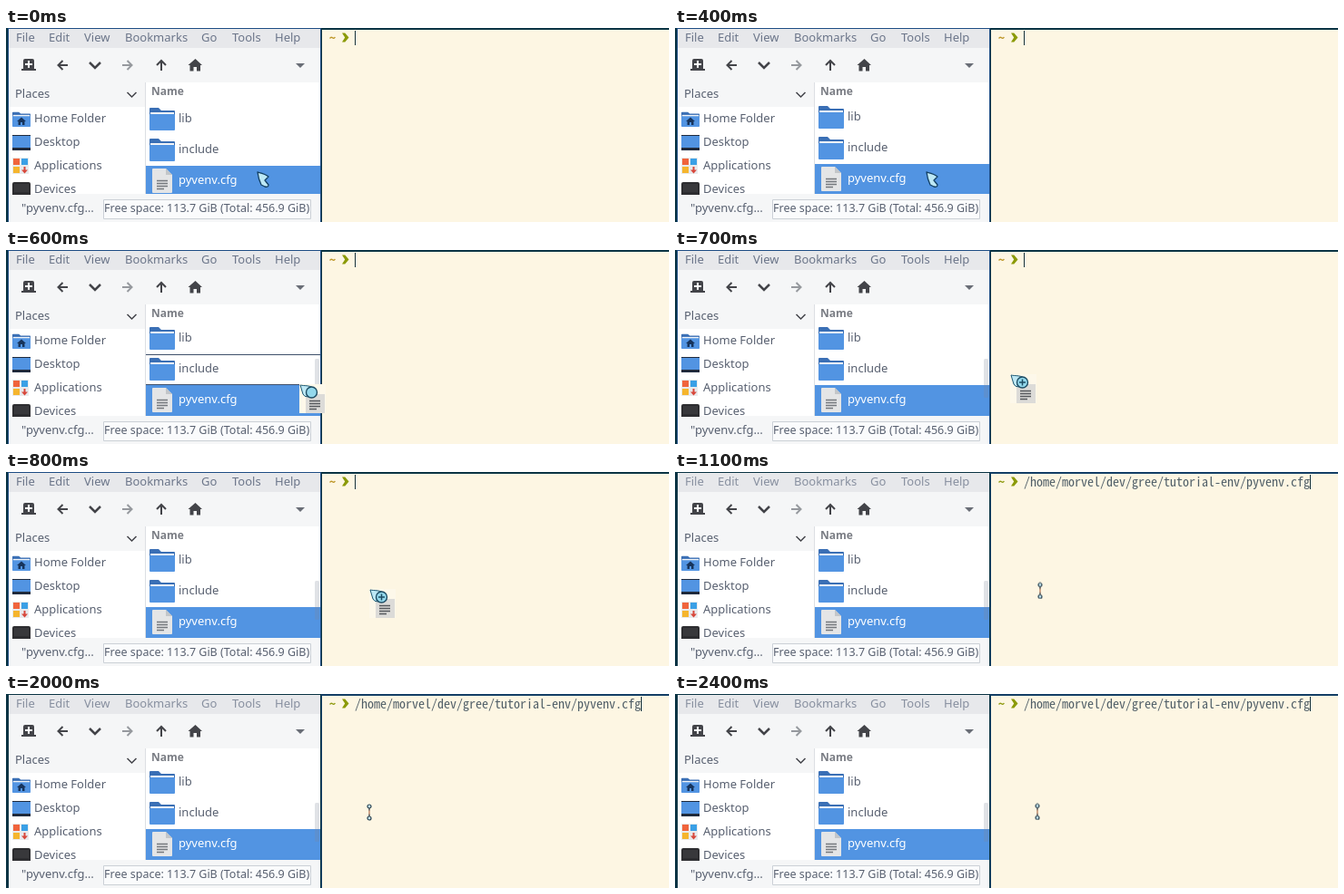
Write an HTML page that moves like this. It is 730x214 px and loops after 2.5 s.

```html
<!DOCTYPE html>
<html lang="en">
<head>
<meta charset="utf-8">
<title>Drag a file into the terminal</title>
<style>
html, body { margin: 0; width: 100%; height: 100%; overflow: hidden; background: #fdf6e3; }
svg { display: block; }
text { font: 13px "Noto Sans", "Open Sans", sans-serif; fill: #586070; white-space: pre; }
.bold { font-weight: 700; font-size: 12px; fill: #7a7d84; }
.small { font-size: 12.5px; }
.term { font: 14px "Noto Sans Mono CJK JP", "Noto Sans Mono CJK SC", "Noto Sans Mono", monospace; fill: #505f68; }
.icon { fill: none; stroke: #434449; stroke-width: 2; }
.solid { fill: #434449; }

.menu, .files, .shell, .tilde, .rows, .target, .thumb, .arrow, .drag, .plus, .paste, .caret, .beam {
  animation: 2500ms step-end infinite;
}
.menu { animation-name: menu; }
.menu text { fill: inherit; }
.files { animation-name: files; }
.shell { animation-name: shell; }
.tilde { animation-name: tilde; font-weight: 700; }
.rows { animation-name: rows; }
.target { animation-name: target; }
.thumb { animation-name: thumb; }
.arrow { animation-name: arrow; }
.drag { animation-name: drag; }
.plus { animation-name: plus; }
.paste { animation-name: paste; }
.caret { animation-name: caret; }
.beam { animation-name: beam; }

@keyframes menu { 0% { fill: #6b7589; } 44%, 100% { fill: #878f9f; } }
@keyframes files { 0% { fill: #1f4e85; } 44%, 100% { fill: #0a3444; } }
@keyframes shell { 0% { fill: #0a3444; } 44%, 100% { fill: #143f66; } }
@keyframes tilde { 0% { fill: #bd9526; } 44%, 100% { fill: #8f9a10; } }
@keyframes rows {
  0% { transform: translateY(0); }
  16% { transform: translateY(-2px); }
  20%, 100% { transform: translateY(-3px); }
}
@keyframes target { 0% { visibility: hidden; } 24% { visibility: visible; } 28%, 100% { visibility: hidden; } }
@keyframes thumb { 0% { visibility: hidden; } 24%, 100% { visibility: visible; } }
@keyframes arrow {
  0% { transform: translate(277px, 159px); visibility: visible; }
  20% { transform: translate(295px, 156px); visibility: visible; }
  24%, 100% { visibility: hidden; }
}
@keyframes drag {
  0% { visibility: hidden; }
  24% { transform: translate(324px, 149px); visibility: visible; }
  28% { transform: translate(370px, 138px); visibility: visible; }
  32% { transform: translate(401px, 130px); visibility: visible; }
  44%, 100% { visibility: hidden; }
}
@keyframes plus { 0% { opacity: 0; } 28%, 100% { opacity: 1; } }
@keyframes paste { 0% { visibility: hidden; } 44%, 100% { visibility: visible; } }
@keyframes caret { 0% { transform: translateX(384px); } 44%, 100% { transform: translateX(699px); } }
@keyframes beam {
  0% { visibility: hidden; }
  44% { transform: translate(402px, 124.5px); visibility: visible; }
  80% { transform: translate(400px, 124px); visibility: visible; }
  96%, 100% { transform: translate(399px, 123.5px); visibility: visible; }
}
</style>
</head>
<body>
<svg width="730" height="214" viewBox="0 0 730 214">
  <defs>
    <clipPath id="list"><path d="M154 79h192v104H154z"/></clipPath>
    <clipPath id="side"><path d="M3 87h150v97H3z"/></clipPath>
    <g id="folder">
      <path fill="#3a6fb5" d="M0 2q0-1 1-1h9l3 3h14q1 0 1 1v6H0z"/>
      <path fill="#f2f4f7" d="M1 6h26v4H1z"/>
      <path fill="#5294e2" d="M0 9q0-1 1-1h26q1 0 1 1v16q0 1-1 1H1q-1 0-1-1z"/>
    </g>
    <g id="page">
      <path fill="#e4e5e6" d="M1 0h14l7 7v19q0 1-1 1H1q-1 0-1-1V1q0-1 1-1z"/>
      <path fill="#c3c6c9" d="M15 0l7 7h-7z"/>
      <path stroke="#74787d" stroke-width="1.4" d="M5 13.500h12M5 16.500h12M5 19.500h12M5 22.500h8"/>
    </g>
  </defs>

  <!-- File manager -->
  <path fill="#f5f6f7" d="M0 0h348v214H0z"/>
  <path fill="#e7e8eb" d="M3 1h343v21H3z"/>
  <g class="menu">
    <text x="11" y="15">File</text>
    <text x="47" y="15">Edit</text>
    <text x="86" y="15">View</text>
    <text x="131" y="15">Bookmarks</text>
    <text x="215" y="15">Go</text>
    <text x="249" y="15">Tools</text>
    <text x="296" y="15">Help</text>
  </g>

  <path class="solid" d="M19 36q0-2 2-2h8q2 0 2 2v9h2v2H17v-2h2z"/>
  <path stroke="#fff" stroke-width="2" d="M25 36v8M21 40h8"/>
  <path class="icon" d="M68 41H58M62.500 36l-5 5 5 5"/>
  <path class="icon" style="stroke-width:2.500" d="M92 38l6 6 6-6"/>
  <path class="icon" style="stroke:#96999e" d="M128 41h10M133.500 36l5 5-5 5"/>
  <path class="icon" d="M171 47V36M166 41l5-5 5 5"/>
  <path class="solid" d="M208.500 34l7.500 7h-2v6.500h-4V43h-3.500v4.500h-4V41h-2z"/>
  <path fill="#696d76" d="M319 39h10l-5 5z"/>

  <text x="10" y="77">Places</text>
  <path class="icon" style="stroke-width:1.500" d="M133.500 71l5 5 5-5"/>

  <path fill="#fff" d="M3 87h150v96H3zM154 60h192v123H154z"/>
  <path fill="#dcdfe3" d="M153 60h1v123h-1z"/>
  <g clip-path="url(#side)">
    <use href="#folder" transform="translate(7 92) scale(.714 .65)"/>
    <path fill="#17345c" d="M17 98.500l5 4.500h-1.500v4h-2.500v-3h-2v3h-2.500v-4H12z"/>
    <path fill="#5294e2" d="M7 118h20v17H7z"/>
    <path fill="#1f2a3c" d="M7 118h20v1H7zM7 132h20v3H7z"/>
    <path fill="#e9eaec" d="M7 143h18v18H7z"/>
    <path fill="#f0643c" d="M8 144h7v7H8z"/>
    <path fill="#3aa0e6" d="M17 144h7v7h-7z"/>
    <path fill="#f5b52e" d="M8 153h7v7H8z"/>
    <path fill="#d8483c" d="M19.500 153h2v3.500h2.500l-3.500 4-3.500-4h2.500z"/>
    <rect x="7" y="170" width="20" height="17" rx="2" fill="#2d2d30"/>
    <path fill="#38383b" d="M9 172h16v9H9z"/>
    <text x="31" y="104">Home Folder</text>
    <text x="31" y="130">Desktop</text>
    <text x="31" y="156">Applications</text>
    <text x="31" y="182">Devices</text>
  </g>

  <text class="bold" x="160" y="74">Name</text>
  <g clip-path="url(#list)">
    <g class="rows">
      <path fill="#5294e2" d="M154 152h192v40H154z"/>
      <use href="#folder" x="158" y="87"/>
      <use href="#folder" x="158" y="121"/>
      <use href="#page" x="161" y="155"/>
      <text x="190" y="104">lib</text>
      <text x="190" y="138">include</text>
      <text x="190" y="172" style="fill:#fff">pyvenv.cfg</text>
    </g>
    <path class="target" fill="#3f506b" d="M154 115h192v1H154zM154 148h192v1H154z"/>
    <rect class="thumb" x="340" y="120" width="5" height="43" rx="1.500" fill="#7d8797" fill-opacity=".24"/>
  </g>

  <text x="17" y="203">"pyvenv.cfg…</text>
  <path fill="#fafbfc" stroke="#cbd0d6" d="M107.500 189.500h228v21h-228z"/>
  <text class="small" x="108" y="203">Free space: 113.7 GiB (Total: 456.9 GiB)</text>

  <!-- Terminal -->
  <path fill="#fdf6e3" d="M348 0h382v214H348z"/>
  <path fill="#0a3444" d="M0 0h2v214H0z"/>
  <path class="files" d="M2 0h345v1H2zM2 0h1v214H2zM346 0h1v214h-1z"/>
  <path class="shell" d="M347 0h383v2H347zM347 0h1v214h-1z"/>
  <text class="term tilde" x="356" y="15.500">~</text>
  <path fill="#8b9a08" d="M370 5.500h3.300l4.200 5-4.200 5H370l3.200-5z"/>
  <text class="term paste" x="384" y="15.500">/home/morvel/dev/gree/tutorial-env/pyvenv.cfg</text>
  <path class="caret" fill="#16323c" d="M0 3h1v16H0z"/>

  <!-- Pointers -->
  <path class="arrow" fill="#bde8f5" stroke="#123f63" stroke-width="1.300" stroke-linejoin="round"
    d="M0 0C4 1 9 2 12 5L8 9l4 5q0 3-4 2l-4-2Q1 8 0 0z"/>
  <g class="drag">
    <path fill="#fdf8ea" d="M-1-1h29v32H-1z"/>
    <path fill="#dcdbd8" d="M6 10h21v21H6z"/>
    <path stroke="#55585c" stroke-width="1.500" d="M10 17.500h12M10 20.500h12M10 23.500h12M10 26.500h8"/>
    <path fill="#bde8f5" stroke="#1d5873" stroke-linejoin="round" d="M0 0C4 1 10 0 14 3L9 13Q4 13 3 10z"/>
    <circle cx="12.500" cy="8" r="6" fill="#93d8ec" stroke="#1d4c63" stroke-width="1.400"/>
    <path class="plus" stroke="#1d4c63" stroke-width="1.500" d="M12.500 4.500v7M9 8h7"/>
  </g>
  <g class="beam" stroke="#2c4453" stroke-width="1.200">
    <path stroke="#c69273" stroke-width="1.600" d="M0 2v9"/>
    <path stroke="#4d6470" d="M0 2v2.500M0 8.500V11"/>
    <circle r="2" fill="#c5e8f2"/>
    <circle cy="13" r="2" fill="#c5e8f2"/>
  </g>
</svg>
</body>
</html>
```
